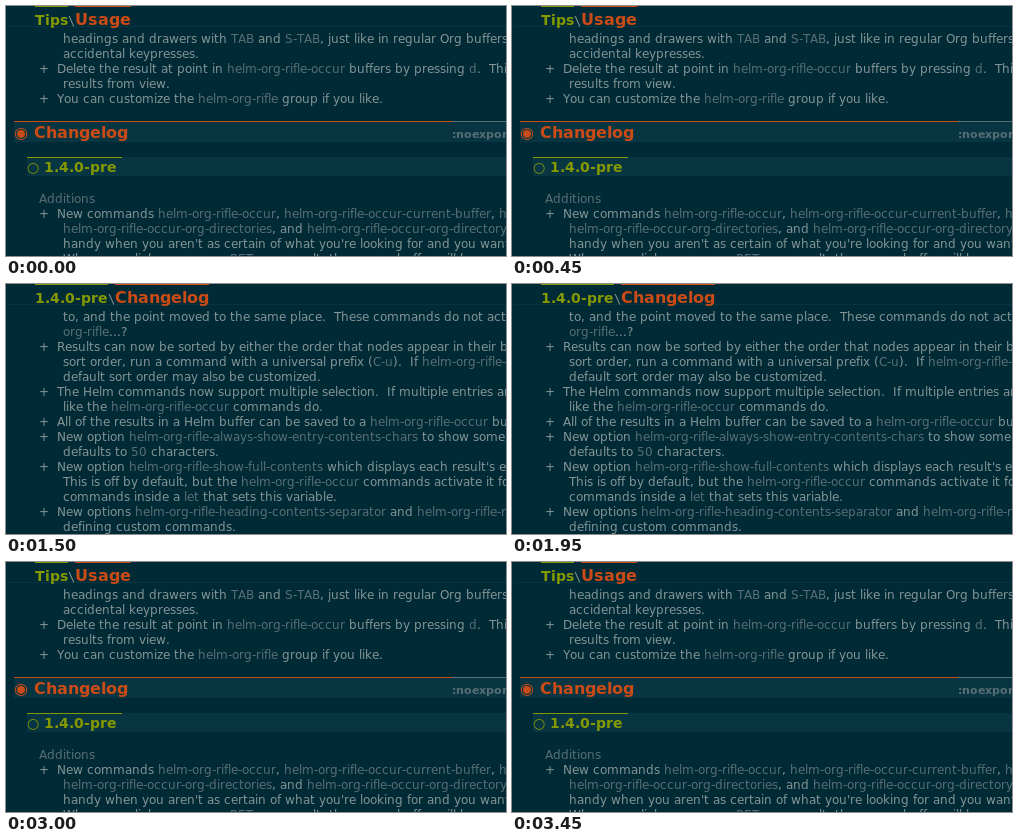
An HTML page with a canvas for the animation above (3750 ms loop, 500 px wide and 250 px high).

```html
<!DOCTYPE html>
<html lang="en">
<head>
<meta charset="utf-8">
<title>Scrolling outline with sticky header</title>
<style>
  html, body { margin: 0; width: 100%; height: 100%; overflow: hidden; background: #002b36; }
  canvas { display: block; }
</style>
</head>
<body>
<canvas id="stage" width="500" height="250"></canvas>
<script>
const ctx = document.getElementById('stage').getContext('2d');
const BG = '#002b36', BAND = '#073642', BODY = '#839496', DIM = '#586e75',
      ORANGE = '#cb4b16', GREEN = '#859900';
const SANS = '"DejaVu Sans", sans-serif', MONO = '"DejaVu Sans Mono", monospace';
const PLAIN = '12px ' + SANS, H1 = 'bold 16px ' + SANS, H2 = 'bold 14px ' + SANS;
const LINE = 15, HEADER = 25, STEP = 750;

// ~tildes~ mark code; a leading + starts a list item
const tips = `headings and drawers with ~TAB~ and ~S-TAB~, just like in regular Org buffers
accidental keypresses.
+  Delete the result at point in ~helm-org-rifle-occur~ buffers by pressing ~d~.  This
results from view.
+  You can customize the ~helm-org-rifle~ group if you like.`.split('\n');

const additions = `+  New commands ~helm-org-rifle-occur~, ~helm-org-rifle-occur-current-buffer~, ~helm-org~
~helm-org-rifle-occur-org-directories~, and ~helm-org-rifle-occur-org-directory~
handy when you aren't as certain of what you're looking for and you want
When you click on or press ~RET~ on a result, the source buffer will be popped
to, and the point moved to the same place.  These commands do not activate
~org-rifle~...?
+  Results can now be sorted by either the order that nodes appear in their buffers
sort order, run a command with a universal prefix (~C-u~).  If ~helm-org-rifle-show~
default sort order may also be customized.
+  The Helm commands now support multiple selection.  If multiple entries are
like the ~helm-org-rifle-occur~ commands do.
+  All of the results in a Helm buffer can be saved to a ~helm-org-rifle-occur~ buffer
+  New option ~helm-org-rifle-always-show-entry-contents-chars~ to show some
defaults to ~50~ characters.
+  New option ~helm-org-rifle-show-full-contents~ which displays each result's entire
This is off by default, but the ~helm-org-rifle-occur~ commands activate it for
commands inside a ~let~ that sets this variable.
+  New options ~helm-org-rifle-heading-contents-separator~ and ~helm-org-rifle-re~
defining custom commands.`.split('\n');

const usage = [['Tips', 62], ['Usage', 125]];
const changelog = [['1.4.0-pre', 102], ['Changelog', 203]];
const views = [
  { scroll: 0, path: usage },
  { scroll: 75, path: usage },
  { scroll: 235, path: changelog },
  { scroll: 75, path: usage },
  { scroll: 0, path: usage }
];

function rect(color, x, y, right, height) {
  ctx.fillStyle = color;
  ctx.fillRect(x, y, right - x, height);
}

// Whole-pixel advances, as in the editor's text layout
function text(str, x, baseline, font, color) {
  ctx.font = font;
  ctx.fillStyle = color;
  for (const ch of str) {
    if (x > 500) break;
    ctx.fillText(ch, x, baseline);
    x += Math.round(ctx.measureText(ch).width);
  }
  return x;
}

function paragraph(lines, top) {
  lines.forEach((line, i) => {
    let x = line[0] === '+' ? 33 : 57;
    line.split('~').forEach((part, j) => {
      x = text(part, x, top + i * LINE + 12, PLAIN, j % 2 ? DIM : BODY);
    });
  });
}

function heading(str, x, top, height, font, color, lineEnd) {
  rect(BAND, x, top, 500, height);
  rect(color, x, top, lineEnd, 1);
  text(str, x, top + height - 4, font, color);
}

function header([[parent, parentEnd], [child, childEnd]]) {
  rect(BG, 0, 0, 500, HEADER);
  rect(BAND, 2, 20, 500, 1);
  rect(GREEN, 29, 0, parentEnd, 1);
  text(parent, 29, 19, H2, GREEN);
  text('\\', parentEnd, 19, '12px ' + MONO, BODY);
  rect(ORANGE, parentEnd + 7, 0, childEnd, 1);
  text(child, parentEnd + 7, 19, H1, ORANGE);
}

function draw({ scroll, path }) {
  rect(BG, 0, 0, 500, 250);
  ctx.save();
  ctx.translate(0, -scroll);
  paragraph(tips, 25);
  heading('◉ Changelog', 8, 115, 21, H1, ORANGE, 446);
  rect(DIM, 446, 115, 500, 1);
  text(':noexport:', 446, 132, 'bold 11px ' + SANS, DIM);
  heading('○ 1.4.0-pre', 21, 151, 19, H2, GREEN, 116);
  text('Additions', 33, 197, PLAIN, DIM);
  paragraph(additions, 200);
  ctx.restore();
  header(path);
}

let shown = -1;
function tick() {
  const step = Math.floor(performance.now() / STEP) % views.length;
  if (step !== shown) draw(views[shown = step]);
  requestAnimationFrame(tick);
}
tick();
</script>
</body>
</html>
```
